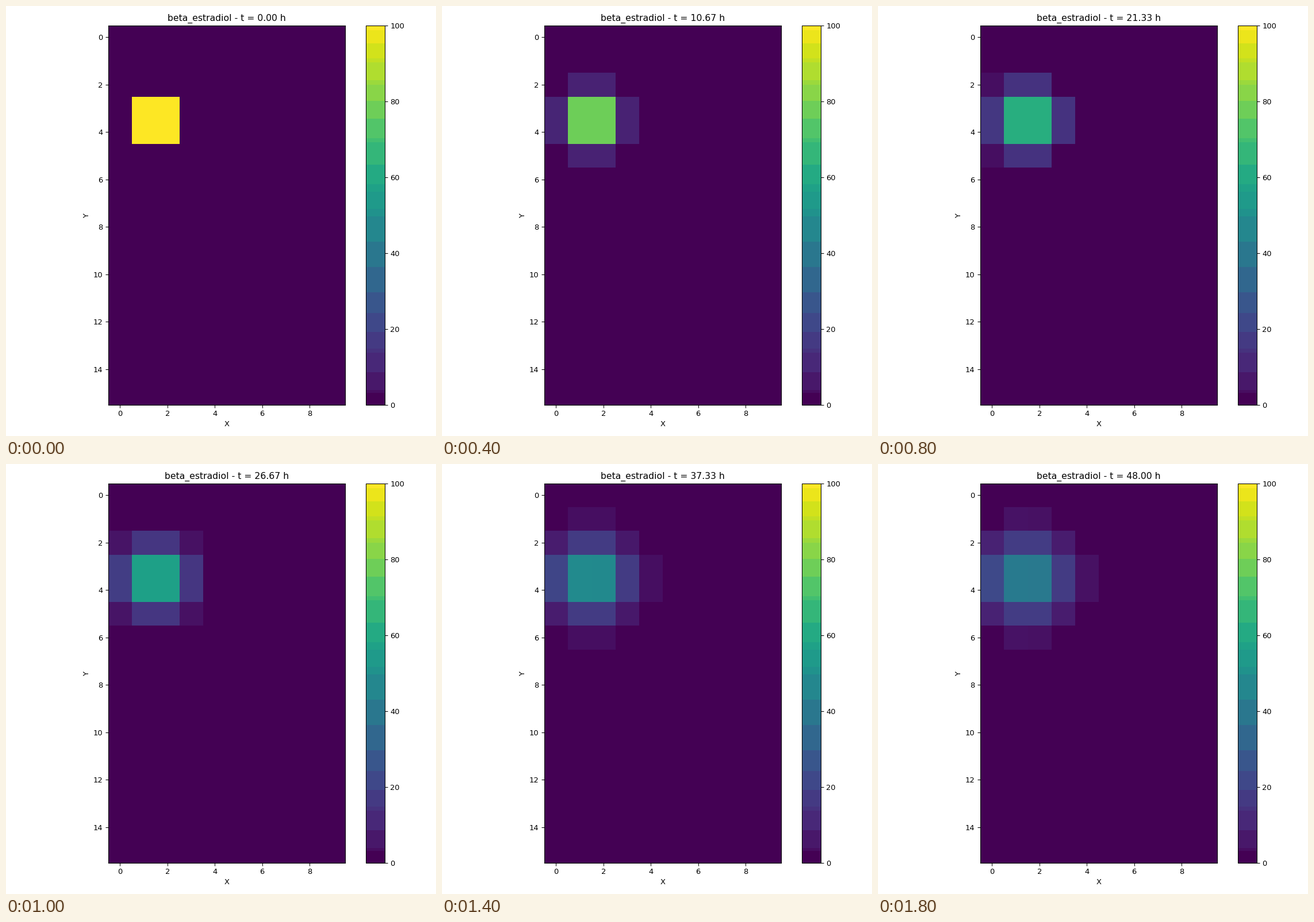
These frames come from a looping animation (748x748 px, 2000 ms). A matplotlib script:

```python
import numpy as np
import matplotlib.pyplot as plt
from matplotlib.animation import FuncAnimation
from matplotlib.cm import ScalarMappable
from matplotlib.colors import ListedColormap, Normalize

plt.rcParams["font.family"] = "DejaVu Sans"

SIZE, DPI = 748, 93.5
NX, NY = 10, 16
FRAMES, HOURS = 10, 48.0
RATE = 0.0125          # diffusion between neighbouring cells, per hour
FLOOR = 3.4            # lower concentrations share the darkest colour

# Edges of the colour steps in the bar
EDGES = [0, 3.2, 4, 8.6, 13.7, 15, 19, 24.2, 29.5, 36.4, 43, 49.7, 51.7,
         56.3, 58.2, 63.2, 69.1, 70.3, 75.5, 80, 84.5, 85.7, 90.4, 91.3,
         95.4, 98.8, 100]


def spread(n, cells, hours):
    """Diffuse a unit block along a closed line of n cells."""
    lap = np.eye(n, k=1) + np.eye(n, k=-1)
    lap -= np.diag(lap.sum(axis=1))
    w, v = np.linalg.eigh(lap)
    start = np.zeros(n)
    start[cells] = 1
    return v @ (np.exp(RATE * hours * w) * (v.T @ start))


def field(hours):
    grid = 100 * np.outer(spread(NY, [3, 4], hours), spread(NX, [1, 2], hours))
    return np.where(grid < FLOOR, 0, grid)


def stepped_viridis():
    viridis = plt.get_cmap("viridis")
    mids = (np.array(EDGES[:-1]) + EDGES[1:]) / 200
    mids[0] = 0
    mids[-1] = 1
    levels = (np.arange(256) + 0.5) / 2.56
    return ListedColormap(viridis(mids[np.digitize(levels, EDGES[1:-1])]))


def heading(hours):
    return f"beta_estradiol - t = {hours:.2f} h"


fig, ax = plt.subplots(figsize=(SIZE / DPI, SIZE / DPI), dpi=DPI,
                       facecolor="white")
norm = Normalize(0, 100)
image = ax.imshow(field(0), cmap="viridis", norm=norm,
                  interpolation="nearest")
ax.set_xlabel("X")
ax.set_ylabel("Y")
title = ax.set_title(heading(0))
fig.colorbar(ScalarMappable(norm, stepped_viridis()), ax=ax)
fig.tight_layout()


def update(i):
    hours = HOURS * i / (FRAMES - 1)
    image.set_data(field(hours))
    title.set_text(heading(hours))
    return image, title


anim = FuncAnimation(fig, update, frames=FRAMES, interval=200, repeat=True,
                     repeat_delay=0, blit=False)
plt.show()
```
